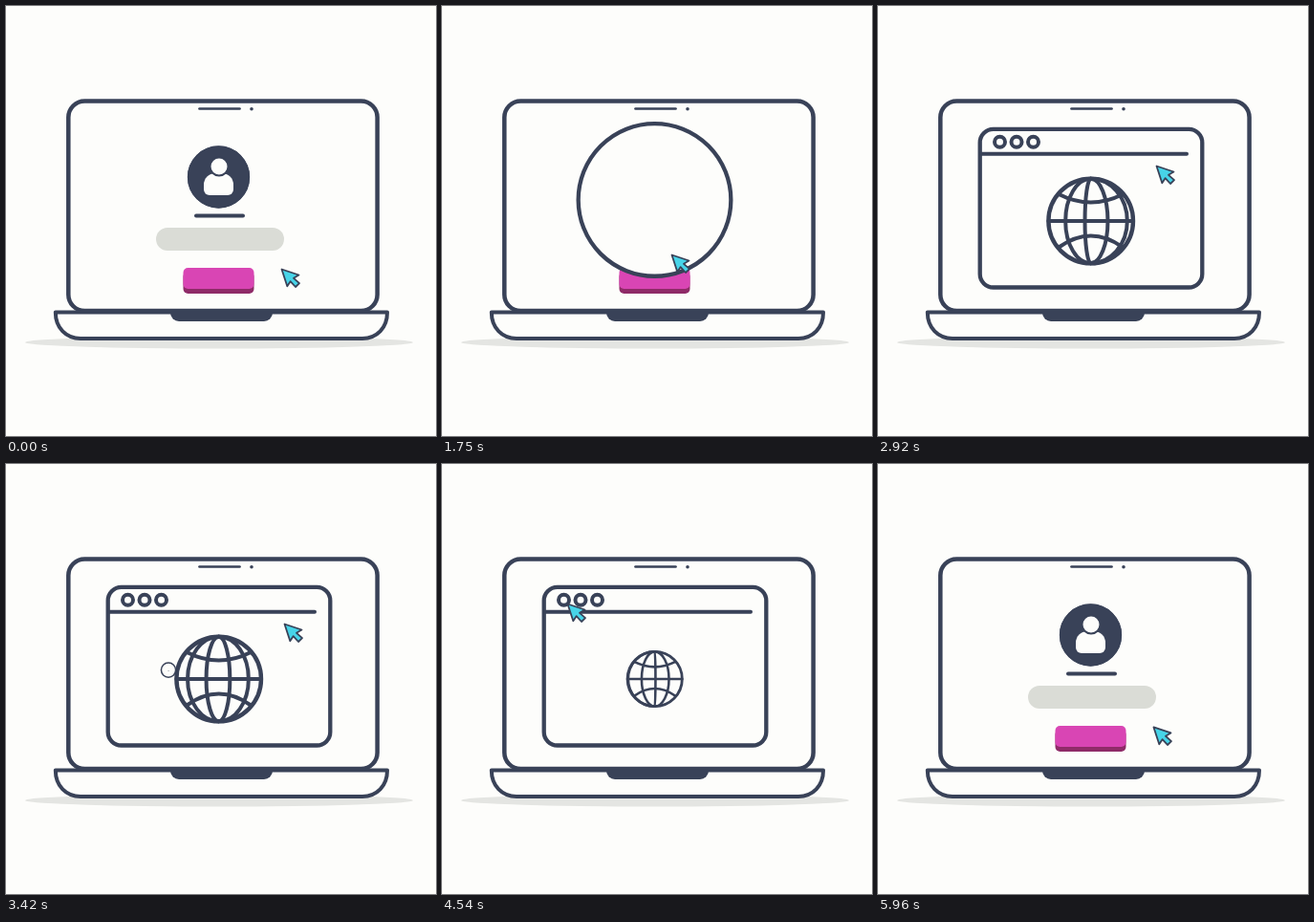
These frames come from a looping animation (450 px wide and 450 px high, 6 s). An HTML page with a canvas:

```html
<!DOCTYPE html>
<html lang="en">
<head>
<meta charset="utf-8">
<title>Laptop login</title>
<style>
  html, body { margin: 0; width: 100%; height: 100%; overflow: hidden; background: #fdfdfb; }
  canvas { display: block; width: 450px; height: 450px; }
</style>
</head>
<body>
<canvas id="stage"></canvas>
<script>
const LOOP = 6000;
const INK = '#394258', PAPER = '#fdfdfb', SHADOW = '#e4e5e2', FIELD = '#dadcd6';
const canvas = document.getElementById('stage');
const g = canvas.getContext('2d');
const dpr = window.devicePixelRatio || 1;
canvas.width = canvas.height = 450 * dpr;

const clamp = v => Math.max(0, Math.min(1, v));
const span = (t, a, b) => clamp((t - a) / (b - a));
const mix = (a, b, k) => a + (b - a) * k;
const inOut = p => p < .5 ? 2 * p * p : 1 - 2 * (1 - p) ** 2;
const out = (p, n = 3) => 1 - (1 - p) ** n;
const ease = (t, a, b) => inOut(span(t, a, b));

function paint(fill, stroke, width = 4) {
  if (fill) { g.fillStyle = fill; g.fill(); }
  if (stroke) { g.strokeStyle = stroke; g.lineWidth = width; g.stroke(); }
}
function disc(x, y, r, fill, stroke, width) {
  g.beginPath();
  g.arc(x, y, Math.max(0, r), 0, 7);
  paint(fill, stroke, width);
}
function box(x, y, w, h, r, fill, stroke, width) {
  g.beginPath();
  g.roundRect(x, y, w, h, r);
  paint(fill, stroke, width);
}
function line(x1, y1, x2, y2, width = 4) {
  g.beginPath();
  g.moveTo(x1, y1);
  g.lineTo(x2, y2);
  paint(null, INK, width);
}
// Draws a part scaled about a point
function scaled(x, y, s, draw) {
  if (s <= 0) return;
  g.save();
  g.translate(x, y);
  g.scale(s, s);
  draw();
  g.restore();
}

function laptop() {
  g.beginPath();
  g.ellipse(223, 352, 203, 6.5, 0, 0, 7);
  paint(SHADOW);
  box(65.3, 99.5, 323.3, 219.5, 17, PAPER, INK, 4.5);
  g.beginPath();
  g.moveTo(51.8, 320.5);
  g.lineTo(399, 320.5);
  g.bezierCurveTo(399, 337, 388, 348, 373, 348);
  g.lineTo(78, 348);
  g.bezierCurveTo(63, 348, 51.8, 337, 51.8, 320.5);
  g.closePath();
  paint(PAPER, INK);
  box(172, 320, 107, 10, [0, 0, 9, 9], INK);
  line(202.5, 107.5, 244.5, 107.5, 2.7);
  disc(257, 107.8, 1.8, INK);
}

// Visibility of a login part: leaves during one span, returns during another
const shown = (t, a, b, c, d) => t < 3000 ? 1 - ease(t, a, b) : out(span(t, c, d));

function login(t) {
  const bar = shown(t, 1580, 1700, 5230, 5400);
  if (bar > 0) line(223.5 - 24.5 * bar, 219.5, 223.5 + 24.5 * bar, 219.5);

  scaled(224, 244, shown(t, 1580, 1720, 5300, 5550), () => {
    box(-67, -12, 134, 24, 12, FIELD);
    if (t < 3000)
      for (let i = 0; i < 6; i++)
        disc(-52 + i * 15, 0, 3.5 * out(span(t, 80 + i * 130, 160 + i * 130)), INK);
  });

  const press = span(t, 1250, 1340) - span(t, 1340, 1430);
  scaled(222.5, 288, shown(t, 1770, 1920, 5400, 5680), () => {
    box(-37, -10, 74, 23, 5, '#8f2b68');
    box(-37, -14 + 3.5 * press, 74, 22, 5, '#d945b4');
  });
}

function person(alpha) {
  if (alpha <= 0) return;
  g.globalAlpha = alpha;
  box(207, 175, 31, 23, [12, 12, 6, 6], PAPER);
  disc(223, 168, 9.5, PAPER, INK, 2);
  g.globalAlpha = 1;
}

// One outline is the avatar, the growing circle and the browser frame
function frame(t) {
  const opening = t < 3000;
  const grow = opening ? ease(t, 1580, 1850) : 1 - ease(t, 4930, 5200);
  const open = opening ? out(span(t, 1850, 2090)) : 1 - ease(t, 4710, 4930);
  const r = mix(32.5, opening ? 98 : 85.6, grow);
  const hw = mix(r, 116.3, open), hh = mix(r, 82.8, open);
  const cx = mix(222.5, 223, open), cy = mix(179, 211.7, grow);
  const inset = 2 * (1 - grow);
  box(cx - hw + inset, cy - hh + inset, 2 * (hw - inset), 2 * (hh - inset),
      mix(r - inset, 14, open), PAPER, INK, 4.3);
  const solid = 1 - clamp(grow / .35);
  if (solid > 0) {
    g.globalAlpha = solid;
    disc(cx, cy, r, INK);
    g.globalAlpha = 1;
    person(solid);
  }
}

function toolbar(t) {
  const k = out(span(t, 1980, 2170)) * (1 - ease(t, 4640, 4780));
  if (k <= 0) return;
  line(108, 154.8, 108 + 215 * k, 154.8);
  for (const x of [127.5, 145, 162.5])
    scaled(x, 142.3, k, () => disc(0, 0, 5.5, PAPER, INK, 4));
}

function parallel(end, control) {
  g.beginPath();
  g.moveTo(-33.5, end);
  g.quadraticCurveTo(0, control, 33.5, end);
  paint(null, INK, 4);
}

function globe(t) {
  const p = span(t, 2170, 2570);
  const s = out(p, 4) * (1 - ease(t, 4440, 4680));
  const off = 1 - out(p);
  scaled(222.7 + 93 * off, 225 + 37 * off, s, () => {
    const R = 44.3;
    disc(0, 0, R, PAPER, INK, 4.4);
    // Meridians drift sideways, crowding a little towards the rim
    const phase = ((t - 2380) / 1420 % .5 + .5) % .5;
    for (let u = phase - 1; u < 1; u += .5) {
      const x = u + .03 * Math.sin(2 * Math.PI * u);
      g.beginPath();
      g.ellipse(0, 0, Math.abs(x) * R, R, 0, -Math.PI / 2, Math.PI / 2, x < 0);
      paint(null, INK, 4);
    }
    line(-R, 0, R, 0);
    parallel(-28, -11);
    parallel(27.5, 3.5);
  });
}

const orbit = t => Math.PI * (t - 3420) / 710;

function coin(t) {
  const a = orbit(t);
  const size = out(span(t, 3300, 3500), 2) * (1 - ease(t, 4300, 4480));
  scaled(225 - 55 * Math.cos(a), 215.5 + 12 * Math.sin(a), size, () => {
    disc(0, 0, 9, PAPER, INK, 1.8);
    const letter = span(t, 3400, 3560);
    if (letter > 0) {
      g.fillStyle = INK;
      g.font = `bold ${16 * letter}px "Liberation Sans", sans-serif`;
      g.textAlign = 'center';
      g.textBaseline = 'middle';
      g.fillText('S', 0, 1);
    }
  });
}

// Stops: start time, end time, x, y
const moves = [
  [900, 1250, 240, 260],
  [1790, 2280, 291, 167],
  [3845, 4340, 131, 146],
  [5000, 5970, 288, 275]
];

function cursor(t) {
  let x = 288, y = 275;
  for (const [a, b, tx, ty] of moves) {
    const k = ease(t, a, b);
    x = mix(x, tx, k);
    y = mix(y, ty, k);
  }
  y -= 4 * Math.sin(Math.PI * span(t, 3845, 4340));
  const click = Math.sin(Math.PI * span(t, 4380, 4520));
  scaled(x, y, 1 - .12 * click, () => {
    g.beginPath();
    [[0.5, 0.5], [18.5, 6.5], [13, 9.8], [19, 15.2], [15, 19], [9.6, 13.2], [6.3, 18.2]]
      .forEach(q => g.lineTo(...q));
    g.closePath();
    paint('#47d4e8', INK, 1.8);
  });
}

function draw(now) {
  const t = now % LOOP;
  g.setTransform(dpr, 0, 0, dpr, 0, 0);
  g.lineCap = g.lineJoin = 'round';
  g.fillStyle = PAPER;
  g.fillRect(0, 0, 450, 450);
  laptop();
  if (t < 2000 || t > 5200) login(t);
  frame(t);
  if (t > 1900 && t < 4800) {
    toolbar(t);
    const behind = Math.sin(orbit(t)) < 0 && t > 4130;
    if (behind) coin(t);
    globe(t);
    if (!behind) coin(t);
  }
  cursor(t);
}

const start = performance.now();
function tick() {
  draw(performance.now() - start);
  requestAnimationFrame(tick);
}
tick();
</script>
</body>
</html>
```
